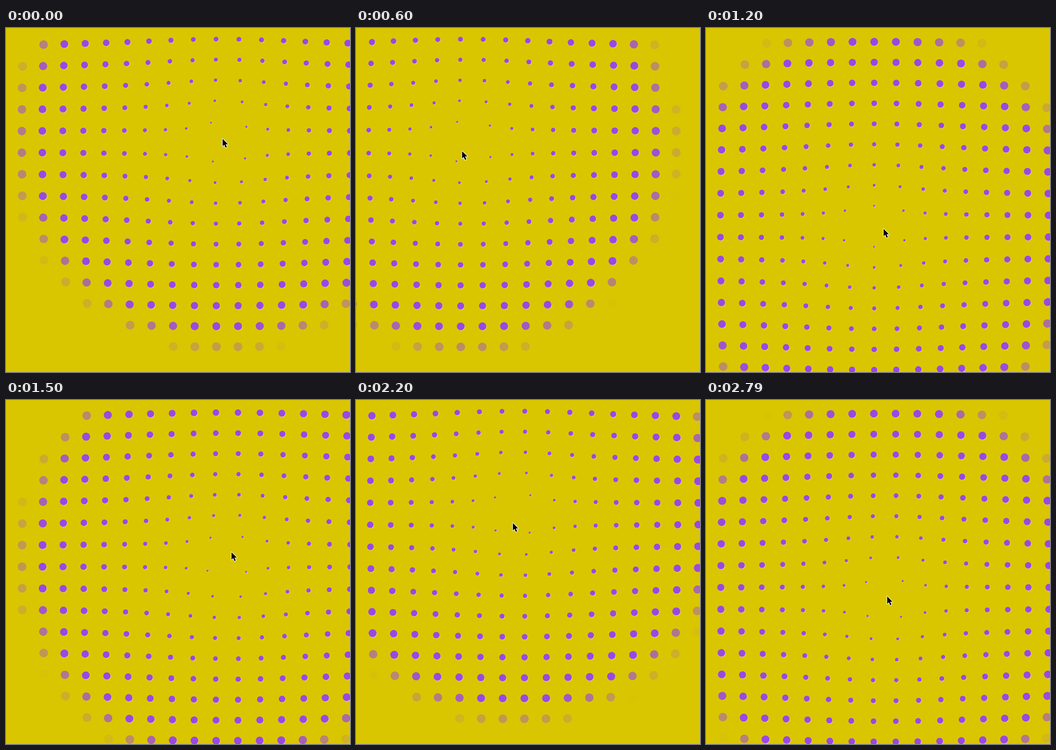
Write an HTML page with a canvas that moves like this. It is 748 by 748 pixels and loops after 2.98 s.

```html
<!DOCTYPE html>
<html lang="en">
<head>
<meta charset="utf-8">
<title>Dot field</title>
<style>
  html, body { margin: 0; width: 100%; height: 100%; overflow: hidden; background: #d9c600; }
  canvas { display: block; width: 100vw; height: 100vh; }
</style>
</head>
<body>
<canvas id="stage" width="748" height="748"></canvas>
<script>
const SIZE = 748, LOOP = 2980, STEP = 45.95;
const ORIGIN = { x: -1.75, y: -5.35 };
const ctx = document.getElementById('stage').getContext('2d');
const arrow = new Path2D('M0 0V16.2L3.7 12.8 6.4 19.2 9.2 18 6.5 11.7H11.6Z');

// Pointer path: time in ms, position, velocity in px per 100 ms
const path = [
  { t: 0,    x: 469, y: 241.7, vx: 0,   vy: -5 },
  { t: 300,  x: 393, y: 211,   vx: -30, vy: -12 },
  { t: 600,  x: 238, y: 250,   vx: -28, vy: 50 },
  { t: 800,  x: 217, y: 382,   vx: 0,   vy: 21 },
  { t: 1500, x: 484, y: 350,   vx: 13,  vy: -60 },
  { t: 1900, x: 477, y: 134.3, vx: -42, vy: -15 },
  { t: 2400, x: 325, y: 347,   vx: 12,  vy: 27 },
  { t: 2790, x: 392, y: 426,   vx: 0,   vy: 0 }
];

// Cubic Hermite segment: returns [position, velocity]
function hermite(p0, p1, v0, v1, span, u) {
  const a = v0 * span, b = v1 * span, d = p1 - p0;
  const c2 = 3 * d - 2 * a - b, c3 = a + b - 2 * d;
  return [p0 + u * (a + u * (c2 + u * c3)), (a + u * (2 * c2 + 3 * u * c3)) / span];
}

function pointerAt(time) {
  let i = 0;
  while (i < path.length - 2 && time >= path[i + 1].t) i++;
  const from = path[i], to = path[i + 1];
  const span = (to.t - from.t) / 100;
  const u = (time - from.t) / (to.t - from.t);
  const [x, vx] = hermite(from.x, to.x, from.vx, to.vx, span, u);
  const [y, vy] = hermite(from.y, to.y, from.vy, to.vy, span, u);
  return { x, y, vx, vy };
}

function disc(x, y, radius, color) {
  ctx.fillStyle = color;
  ctx.beginPath();
  ctx.arc(x, y, radius, 0, 2 * Math.PI);
  ctx.fill();
}

// Each dot is pushed away from the pointer, grows with distance, then fades out
function drawDot(x, y, pointer) {
  const dx = x - pointer.x, dy = y - pointer.y;
  const dist = Math.hypot(dx, dy) || 1;
  const alpha = Math.min(1, (464 - dist) / 64);
  if (alpha <= 0) return;
  const push = 0.03 * (SIZE - dist) / dist;
  const px = x + dx * push, py = y + dy * push;
  const radius = 1.7 + 0.0176 * dist;
  if (alpha === 1) disc(px + 0.7, py + 0.7, radius, '#ecdcae');
  ctx.globalAlpha = alpha;
  disc(px, py, radius, '#9b48e2');
  ctx.globalAlpha = 1;
}

function drawArrow({ x, y, vx, vy }) {
  ctx.save();
  ctx.translate(x + 2 + vx / 3, y + 1 + vy / 3);
  ctx.lineWidth = 2.2;
  ctx.lineJoin = 'round';
  ctx.strokeStyle = '#fff';
  ctx.stroke(arrow);
  ctx.fillStyle = '#000';
  ctx.fill(arrow);
  ctx.restore();
}

function frame(now) {
  const ms = now % LOOP;
  const time = ms >= 2790 ? 2790 : Math.min(2600, Math.floor(ms / 100) * 100);
  const pointer = pointerAt(time);
  ctx.fillStyle = '#d9c600';
  ctx.fillRect(0, 0, SIZE, SIZE);
  for (let row = 0; row < 18; row++)
    for (let col = 0; col < 18; col++)
      drawDot(ORIGIN.x + col * STEP, ORIGIN.y + row * STEP, pointer);
  drawArrow(pointer);
}

const start = performance.now();
function tick() {
  frame(performance.now() - start);
  requestAnimationFrame(tick);
}
tick();
</script>
</body>
</html>
```
